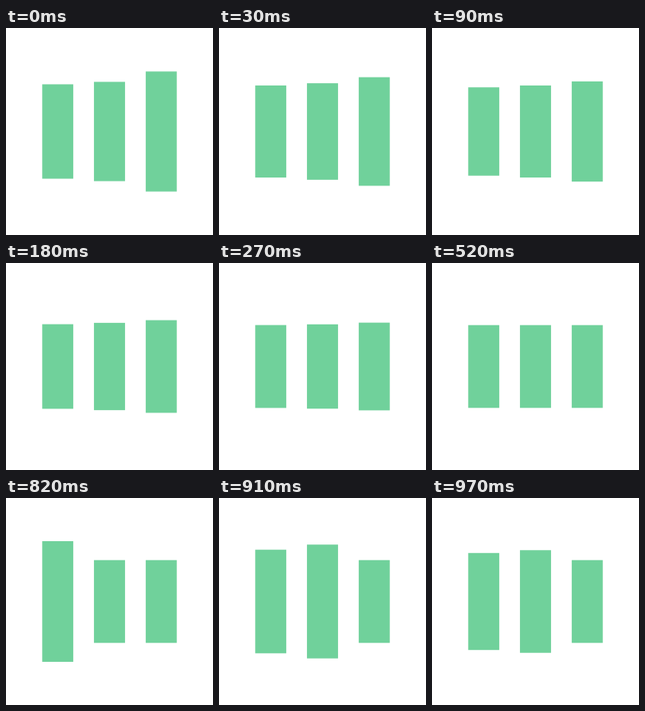
Write an HTML page that moves like this. It is 259 by 259 pixels and loops after 1 s.

```html
<!DOCTYPE html>
<html lang="en">
<head>
<meta charset="utf-8">
<title>Pulsing bars</title>
<style>
html, body { margin: 0; width: 100%; height: 100%; overflow: hidden; background: #fff; }
svg { display: block; width: 100vw; height: 100vh; }
rect { fill: #70d19b; }
</style>
</head>
<body>
<svg viewBox="0 0 100 100">
  <rect x="17.5" y="30" width="15" height="40"/>
  <rect x="42.5" y="30" width="15" height="40"/>
  <rect x="67.5" y="30" width="15" height="40"/>
</svg>
<script>
const LOOP = 1000, STEPS = 33, SHRINK = 500, REST = 40;
const rects = document.querySelectorAll('rect');
const bars = [
  { start: 800, peak: 64 },
  { start: 900, peak: 58 },
  { start: 0, peak: 58 }
];

// cubic-bezier(0, 0.5, 0.5, 1)
function ease(x) {
  if (x >= 1) return 1;
  let lo = 0, hi = 1;
  for (let i = 0; i < 24; i++) {
    const s = (lo + hi) / 2;
    if (1.5 * s * s - 0.5 * s ** 3 < x) lo = s; else hi = s;
  }
  return 1.5 * lo - 0.5 * lo ** 3;
}

// Steps change on the nearest hundredth of a second.
const stepStart = i => Math.round(i * 100 / STEPS) * 10;

function stepAt(t) {
  let i = Math.floor(t * STEPS / LOOP);
  if (t < stepStart(i)) i--;
  else if (t >= stepStart(i + 1)) i++;
  return i % STEPS;
}

function draw(now) {
  const t = stepAt(now % LOOP) * LOOP / STEPS;
  bars.forEach(({ start, peak }, i) => {
    const age = (t - start + LOOP) % LOOP;
    const h = peak + (REST - peak) * ease(age / SHRINK);
    rects[i].setAttribute('y', 50 - h / 2);
    rects[i].setAttribute('height', h);
  });
}

let origin = null;
function tick(now) {
  if (origin === null) origin = now;
  draw(Math.max(0, now - origin));
  requestAnimationFrame(tick);
}
draw(0);
requestAnimationFrame(tick);
</script>
</body>
</html>
```
